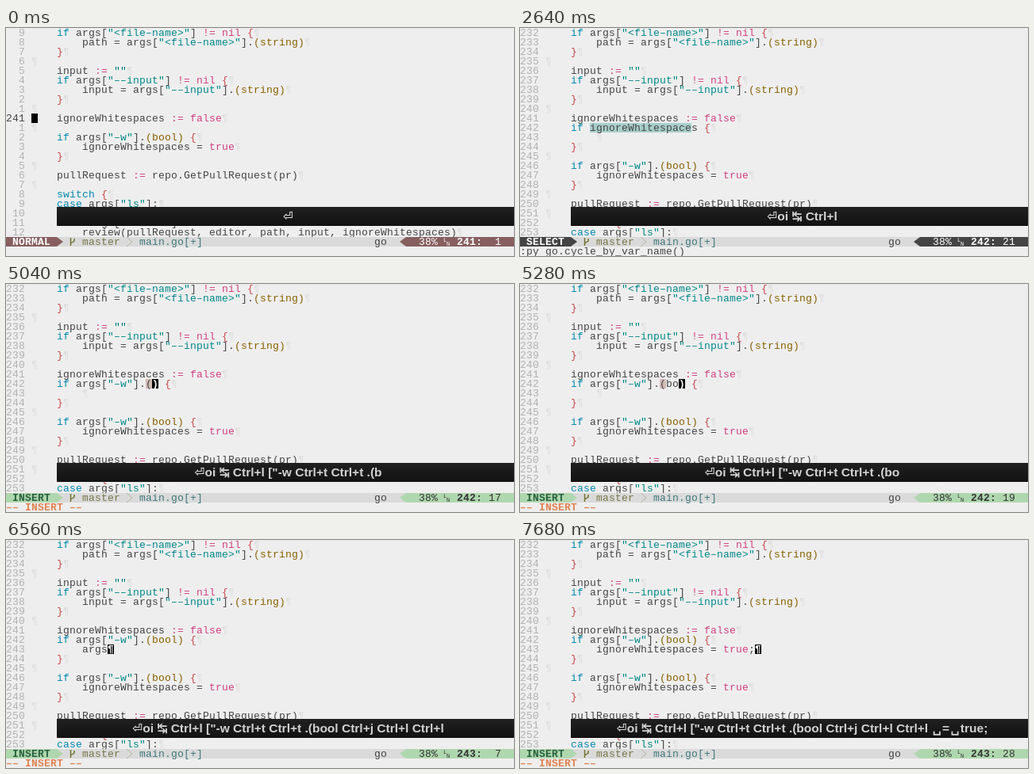
Recreate the animation shown at these times as an HTML page with a canvas. Size 640 by 288 pixels, loop 8 s.

```html
<!DOCTYPE html>
<html lang="en">
<head>
<meta charset="utf-8">
<title>Editor session</title>
<style>
html, body { margin: 0; width: 100%; height: 100%; overflow: hidden; background: #eee; }
canvas { display: block; }
</style>
</head>
<body>
<canvas id="stage" width="640" height="288"></canvas>
<script>
const ctx = document.getElementById('stage').getContext('2d');
const LOOP = 8000, CW = 8, RH = 12, FIRST_LINE = 232;
const MONO = '"Liberation Mono", "DejaVu Sans Mono", monospace';
const INK = '#444', BLUE = '#0087af', TEAL = '#008787', PINK = '#d0407f', RED = '#c84545', BROWN = '#875f00';

const before = `	if args["<file-name>"] != nil {
		path = args["<file-name>"].(string)
	}

	input := ""
	if args["--input"] != nil {
		input = args["--input"].(string)
	}

	ignoreWhitespaces := false`.split('\n');

const after = `
	if args["-w"].(bool) {
		ignoreWhitespaces = true
	}

	pullRequest := repo.GetPullRequest(pr)

	switch {
	case args["ls"]:
		list(pullRequest)
	case args["review"]:
		review(pullRequest, editor, path, input, ignoreWhitespaces)`.split('\n');

// Shown key presses: time, text added
const SPACE = '\u200a␣\u200a';
const keys = [
  [0, '⏎'], [960, 'o'], [1600, 'i'], [1760, ' ↹'], [2640, ' Ctrl+l'],
  [3200, ' ['], [3440, '"'], [3680, '-'], [3760, 'w'],
  [4400, ' Ctrl+t'], [4560, ' Ctrl+t'], [4720, ' .'], [4800, '('],
  [5040, 'b'], [5200, 'o'], [5360, 'o'], [5520, 'l'], [5680, ' Ctrl+j'],
  [6320, ' Ctrl+l'], [6560, ' Ctrl+l'], [6880, ' ' + SPACE], [6960, '='], [7040, SPACE], [7120, 't'],
  [7280, 'r'], [7360, 'u'], [7440, 'e'], [7520, ';']
];

// A "|" marks the cursor
const block = (cond, body = '') => [`\tif ${cond} {`, '\t\t' + body, '\t}'];
const cond = (t, text, mode, message) => [t, block(text), mode, message];
const body = (t, text) => [t, block('args["-w"].(bool)', text + '|')];
const CYCLE = ':py go.cycle_by_var_name()';
const NAME = 'ignoreWhitespaces';

// Edits: time, inserted lines, mode, message
const edits = [
  [0, [], 'NORMAL', ''],
  [960, ['\t|']],
  [1680, ['\ti|']],
  cond(1840, NAME + '|'),
  cond(1920, 'ignoreWhitespace|s', 'SELECT'),
  cond(2640, 'ignoreWhitespace|s', 'SELECT', CYCLE),
  cond(2720, 'args|', 'INSERT', CYCLE),
  cond(2800, 'args|'),
  cond(3280, 'args[|]'),
  cond(3520, 'args["|"]'),
  cond(3760, 'args["-w|"]'),
  cond(4480, 'args["-w"|]'),
  cond(4640, 'args["-w"]|'),
  cond(4800, 'args["-w"].|'),
  cond(4880, 'args["-w"].(|)'),
  cond(5120, 'args["-w"].(b|)'),
  cond(5280, 'args["-w"].(bo|)'),
  cond(5440, 'args["-w"].(boo|)'),
  cond(5600, 'args["-w"].(bool|)'),
  body(5760, ''),
  body(6400, 'args'),
  body(6640, NAME),
  body(6960, NAME + ' '),
  body(7040, NAME + ' ='),
  body(7120, NAME + ' = t'),
  body(7360, NAME + ' = tr'),
  body(7440, NAME + ' = tru'),
  body(7520, NAME + ' = true;')
];

const modes = {
  NORMAL: { bg: '#875f5f', fg: '#fff', endFg: '#fff' },
  SELECT: { bg: '#444', fg: '#fff', endFg: '#fff' },
  INSERT: { bg: '#afd7af', fg: '#285f3c', endFg: '#333' }
};

const syntax = [
  [/"[^"]*"?/g, TEAL],
  [/\b(?:if|switch|case)\b/g, BLUE],
  [/\b(?:nil|true|false)\b|:=|!=/g, PINK],
  [/[{}]/g, RED],
  [/\((?:string|bool)\)/g, BROWN]
];

function rect(x, y, w, h, color) {
  ctx.fillStyle = color;
  ctx.fillRect(x, y, w, h);
}

function cell(col, row, color) {
  rect(col * CW, row * RH, CW, RH, color);
}

// Hyphens are drawn as wide as the cell, so that pairs join
function put(text, col, row, color, weight = 'normal') {
  ctx.font = `${weight} 13px ${MONO}`;
  ctx.fillStyle = color;
  [...text.replaceAll('-', '–')].forEach((ch, i) => ctx.fillText(ch, (col + i) * CW, row * RH + 10));
}

function triangle(x1, x2, color) {
  ctx.fillStyle = color;
  ctx.beginPath();
  ctx.moveTo(x1, 264);
  ctx.lineTo(x2, 270);
  ctx.lineTo(x1, 276);
  ctx.fill();
}

function colorize(text) {
  const colors = Array(text.length).fill(INK);
  for (const [pattern, color] of syntax)
    for (const m of text.matchAll(pattern)) colors.fill(color, m.index, m.index + m[0].length);
  return colors;
}

function drawLine(marked, row, mode) {
  const cursor = marked.indexOf('|');
  const text = marked.replace('|', '');
  const colors = colorize(text);
  const opener = { ')': '(', ']': '[' }[text[cursor]];
  const match = opener ? text.lastIndexOf(opener, cursor) : -1;
  let col = 4;
  [...text, '¶'].forEach((ch, i) => {
    const onCursor = i === cursor && mode !== 'SELECT';
    if (onCursor) cell(col, row, '#000');
    else if (mode === 'SELECT' && i >= 4 && i < cursor) cell(col, row, '#a9cfcb');
    else if (i === match) cell(col, row, '#d3bcb4');
    if (ch === '\t') {
      col += 4;
    } else {
      put(ch, col, row, onCursor ? '#fff' : colors[i] || '#dfdfdf', onCursor ? 'bold' : 'normal');
      col++;
    }
  });
}

function drawStatus(mode, line, column) {
  const m = modes[mode];
  rect(0, 264, 640, 12, '#dadada');
  ctx.strokeStyle = '#b4b4a4';
  ctx.lineWidth = 1;
  ctx.beginPath();
  ctx.moveTo(152, 264);
  ctx.lineTo(159, 270);
  ctx.lineTo(152, 276);
  ctx.stroke();
  rect(0, 264, 64, 12, m.bg);
  triangle(64, 72, m.bg);
  put(mode, 1, 22, m.fg, 'bold');

  // Branch sign
  ctx.strokeStyle = '#737332';
  ctx.lineWidth = 1.5;
  ctx.beginPath();
  ctx.moveTo(81.5, 265);
  ctx.lineTo(81.5, 275);
  ctx.moveTo(81.5, 272);
  ctx.lineTo(86, 269);
  ctx.lineTo(86, 266);
  ctx.stroke();
  put('master', 12, 22, '#76764a');
  put('main.go[+]', 21, 22, '#3f7878');
  put('go', 58, 22, INK);

  rect(504, 264, 136, 12, m.bg);
  triangle(504, 496, m.bg);
  put('38%', 65, 22, m.endFg);
  ctx.font = `7px ${MONO}`;
  ctx.fillText('L', 551, 270);
  ctx.fillText('N', 555, 275);
  put(line + ':', 71, 22, m.endFg, 'bold');
  put(String(column).padStart(3), 75, 22, m.endFg);
}

function drawKeys(text) {
  const shade = ctx.createLinearGradient(0, 226, 0, 250);
  shade.addColorStop(0, '#202020');
  shade.addColorStop(1, '#121212');
  rect(64, 226, 576, 24, shade);
  ctx.font = 'bold 15.5px "Liberation Sans", "DejaVu Sans", sans-serif';
  ctx.fillStyle = '#d2d2d2';
  ctx.textAlign = 'center';
  ctx.fillText(text, 355.5, 243);
  ctx.textAlign = 'left';
}

function draw(t) {
  const [, added, mode = 'INSERT', message = `-- ${mode} --`] = edits.findLast(e => e[0] <= t);
  const normal = mode === 'NORMAL';
  const lines = [...before, ...added, ...after].slice(0, 22);
  if (normal) lines[9] = '|' + lines[9];
  const current = lines.findIndex(l => l.includes('|'));

  rect(0, 0, 640, 288, '#eee');
  lines.forEach((line, row) => {
    const here = normal && row === current;
    const number = normal && !here ? Math.abs(row - current) : FIRST_LINE + row;
    put(String(number).padStart(3), 0, row, here ? INK : '#b2b2b2');
    drawLine(line, row, row === current ? mode : '');
  });
  drawKeys(keys.filter(k => k[0] <= t).map(k => k[1]).join(''));
  drawStatus(mode, FIRST_LINE + current, lines[current].indexOf('|') + 1);
  const plain = message.startsWith(':');
  put(message, 0, 23, plain ? INK : '#e08050', plain ? 'normal' : 'bold');
}

function frame() {
  draw(performance.now() % LOOP);
  requestAnimationFrame(frame);
}
frame();
</script>
</body>
</html>
```
